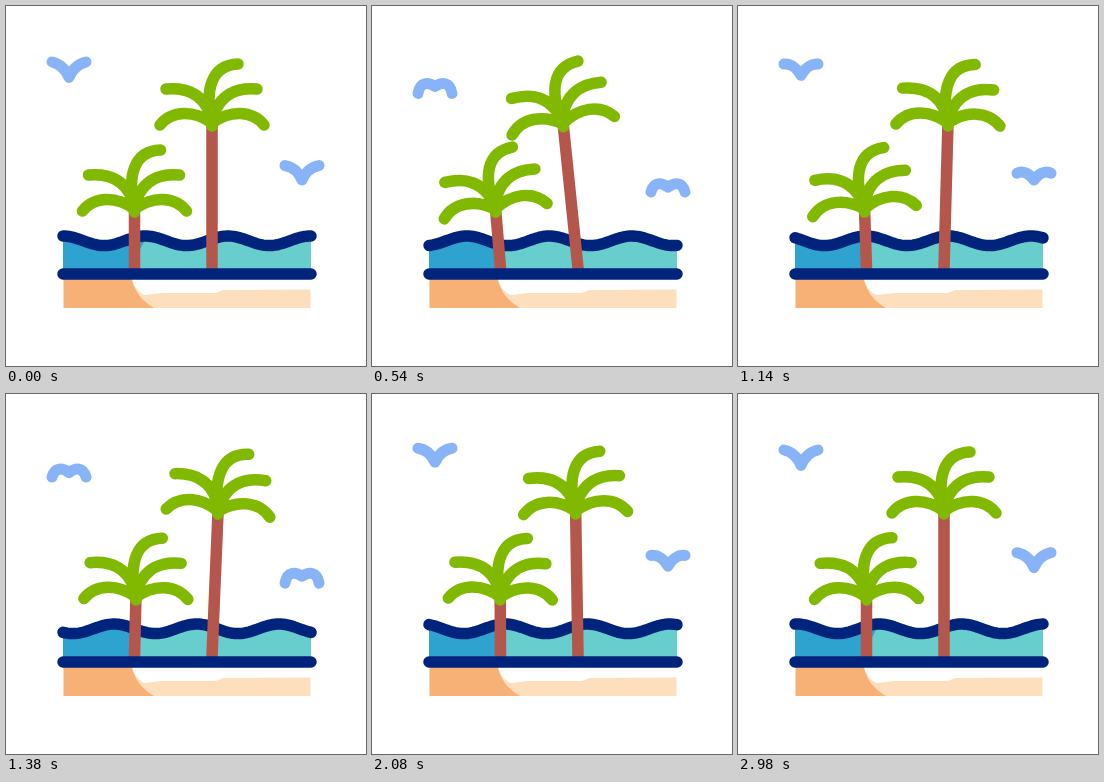
Animation, 360 px wide and 360 px high, one loop 3 s. Source, as an HTML page with a canvas:

```html
<!DOCTYPE html>
<html lang="en">
<head>
<meta charset="utf-8">
<title>Palm beach</title>
<style>
  html, body { margin: 0; width: 100%; height: 100%; overflow: hidden; background: #fff; }
  canvas { display: block; }
</style>
</head>
<body>
<canvas id="stage" width="360" height="360"></canvas>
<script>
const ctx = document.getElementById('stage').getContext('2d');
const LOOP = 3000, BEAT = 1000, TAU = 2 * Math.PI;
const LEFT = 57, RIGHT = 305, WAVELENGTH = 82.5;
const NAVY = '#00247b', GREEN = '#80b900', TRUNK = '#b5564c', BIRD = '#88b4f7';

const mix = (a, b, k) => a + (b - a) * k;
const smooth = k => k * k * (3 - 2 * k);

function stroke(path, color, width = 11.5) {
  ctx.strokeStyle = color;
  ctx.lineWidth = width;
  ctx.stroke(path);
}

function fill(path, color) {
  ctx.fillStyle = color;
  ctx.fill(path);
}

// Dying pendulum: each eased half swing turns back at a smaller angle, the fourth ends at rest
function swing(t, degrees, step, decay) {
  const turn = n => n < 1 || n > 3 ? 0 : -degrees * (-decay) ** (n - 1);
  const n = Math.floor(t / step);
  return mix(turn(n), turn(n + 1), smooth(t / step - n)) * TAU / 360;
}

// Leaves around the top of the trunk
const crown = new Path2D(`
  M0 0 C-8 -38 0 -61 26 -62
  M-46 -37 C-26 -39 -7 -33 0 -6
  M45 -37 C26 -39 7 -33 0 -6
  M-52 -1 C-40 -16 -18 -16 0 -3
  M52 -1 C40 -16 18 -16 0 -3`);

// The leaves swing wider and slower than the trunk
function drawPalm(x, height, lean, bend) {
  ctx.save();
  ctx.translate(x, 262);
  ctx.rotate(lean);
  ctx.lineCap = 'butt';
  stroke(new Path2D(`M0 3 V${-height}`), TRUNK);
  ctx.lineCap = 'round';
  ctx.translate(0, -height);
  ctx.rotate(bend - lean);
  stroke(crown, GREEN);
  ctx.restore();
}

// Wings beat between up (0) and down (1) while the bird rises a little
function drawBird(x, y, t, lead) {
  const flap = (1 - Math.cos(TAU * (t + lead) / BEAT)) / 2;
  const lift = 5 * Math.sin(Math.PI * t / LOOP) * (1 - flap);
  const tip = mix(56, 88, flap), body = mix(71.5, 80.5, flap);
  const outer = mix(9, 15, flap), outerY = mix(58, 76, flap);
  const inner = mix(3, 7, flap), innerY = mix(64, 76, flap);
  ctx.save();
  ctx.translate(x, y - lift);
  stroke(new Path2D(`M-17 ${tip} C${-outer} ${outerY} ${-inner} ${innerY} 0 ${body}
    C${inner} ${innerY} ${outer} ${outerY} 17 ${tip}`), BIRD, 11);
  ctx.restore();
}

function drawSea(t) {
  const points = [];
  for (let x = LEFT; x <= RIGHT; x += 2) {
    const phase = (x - LEFT) / WAVELENGTH + t / BEAT;
    points.push(`${x} ${234.8 - 4.8 * Math.cos(TAU * phase)}`);
  }
  const surface = 'M' + points.join('L');
  const water = new Path2D(`${surface} V265 H${LEFT} Z`);
  const edge = 134 + 9 * Math.cos(TAU * t / LOOP);
  fill(water, '#67cdcd');
  ctx.save();
  ctx.clip(water);
  fill(new Path2D(`M${LEFT} 220 H${edge + 5} Q${mix(edge, 125, .6)} 243 125 265 H${LEFT} Z`), '#2ea3cf');
  ctx.restore();
  stroke(new Path2D(surface), NAVY);
}

const paleSand = new Path2D('M127 277 Q132 287 139 289 L156 287 L210 287 L217 284 L304.5 283.5 V302 H126 Z');
const sand = new Path2D('M57.5 273 H126 C128 285 136 295 148 302 H57.5 Z');
const ground = new Path2D(`M${LEFT} 268 H${RIGHT}`);

function draw(t) {
  ctx.fillStyle = '#fff';
  ctx.fillRect(0, 0, 360, 360);
  ctx.lineCap = ctx.lineJoin = 'round';
  fill(paleSand, '#fddfbd');
  fill(sand, '#f7b075');
  drawSea(t);
  drawPalm(206, 142, swing(t, 6.3, 640, .42), swing(t, 11.4, 670, .4));
  drawPalm(128.5, 56, swing(t, 6, 760, .35), swing(t, 11.6, 820, .36));
  stroke(ground, NAVY);
  drawBird(63, 0, t, 0);
  drawBird(296, 102, t, 70);
}

const start = performance.now();
function tick() {
  draw((performance.now() - start) % LOOP);
  requestAnimationFrame(tick);
}
tick();
</script>
</body>
</html>
```
